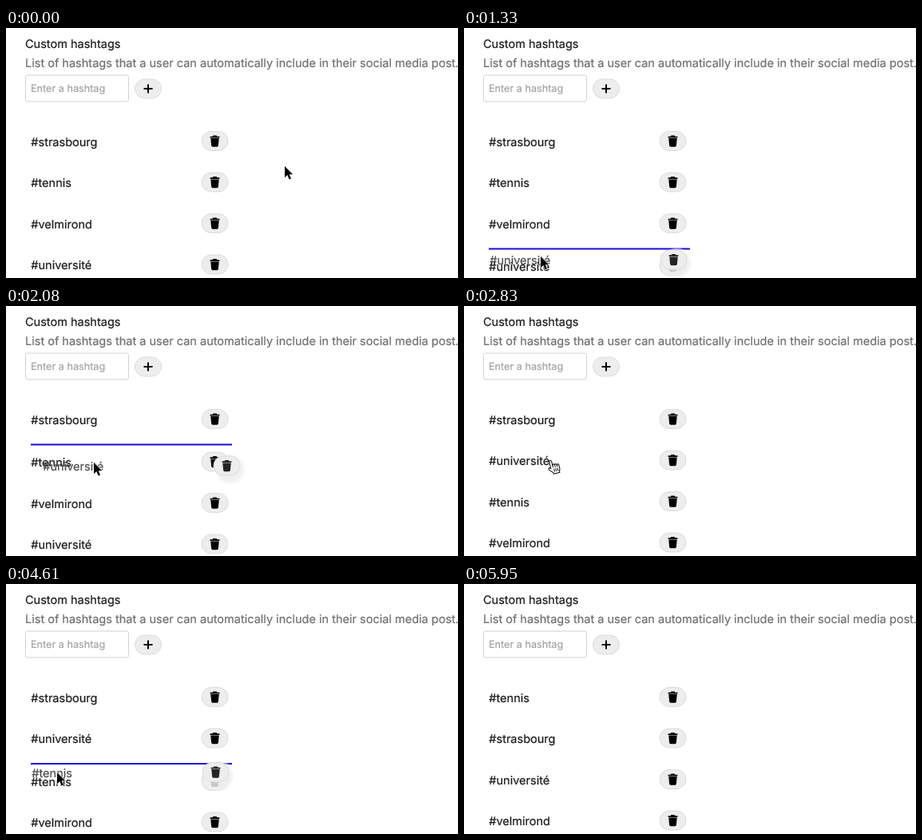
Recreate the animation shown at these times as an HTML page. Size 566 by 313 pixels, loop 6.7 s.

```html
<!DOCTYPE html>
<html lang="en">
<head>
<meta charset="utf-8">
<title>Custom hashtags</title>
<style>
  html, body { margin: 0; width: 100%; height: 100%; overflow: hidden; background: #fff; }
  svg { display: block; width: 566px; height: 313px; }
  text {
    font: 14.52px Inter, "Open Sans", sans-serif;
    fill: #1c1c1c; stroke: #1c1c1c; stroke-width: .22px;
    text-rendering: geometricPrecision;
  }
  .hint { fill: #707070; stroke: #707070; }
  .placeholder { font-size: 12.65px; fill: #a4a4a4; stroke: #a4a4a4; }
  .field { fill: #fff; stroke: #d2d2d2; }
  .pill { fill: #ededed; stroke: #dcdcdc; }
  #ghost text { opacity: .78; }
  #ghost .pill { fill: #f1f1f1; stroke: #e6e6e6; fill-opacity: .92; }
  #ghost .bin { opacity: .85; }
</style>
</head>
<body>
<svg viewBox="0 0 566 313">
  <defs>
    <radialGradient id="soft">
      <stop offset="0" stop-color="#e9e9e9"/>
      <stop offset=".8" stop-color="#efefef" stop-opacity=".8"/>
      <stop offset="1" stop-color="#f4f4f4" stop-opacity=".4"/>
    </radialGradient>
    <g id="button">
      <rect class="pill" x="-16.5" y="-12" width="33" height="24" rx="12"/>
    </g>
    <g id="trash">
      <use href="#button"/>
      <path class="bin" d="M-5.9-5.8H-3L-2-7H2L3-5.8H5.9V-4.1H-5.9ZM-5.2-3.5H5.2L4.4 5.6Q4.2 7.2 2.8 7.2H-2.8Q-4.2 7.2-4.4 5.6Z"/>
    </g>
  </defs>

  <text x="24" y="25">Custom hashtags</text>
  <text class="hint" x="24" y="49">List of hashtags that a user can automatically include in their social media post.</text>
  <rect class="field" x="24.5" y="59" width="129" height="33" rx="2.5"/>
  <text class="placeholder" x="31" y="80.2">Enter a hashtag</text>
  <use href="#button" x="178" y="76"/>
  <path d="M172.5 76H183.5M178 70.5V81.5" stroke="#000" stroke-width="2"/>

  <g id="list"></g>
  <rect id="marker" x="31" width="252" height="2" fill="#2008d8"/>
  <g id="ghost">
    <circle cx="265.5" cy="4" r="19" fill="url(#soft)"/>
  </g>

  <path id="arrow" d="M0 0V14.2L3.3 11.1 5.6 16.5 8 15.5 5.7 10.2H10.2Z"
        stroke="#fff" stroke-width="1.3" stroke-linejoin="round" paint-order="stroke"/>
  <g id="hand" fill="#fff" stroke="#000" stroke-linejoin="round" stroke-linecap="round">
    <g transform="translate(-1 -1.3) rotate(-15 2 9)">
      <path d="M-1.5 10V1.5a1.5 1.5 0 0 1 3 0V6.6a1.4 1.4 0 0 1 2.8.3a1.3 1.3 0 0 1 2.6.6a1.2 1.2 0 0 1 2.3.8V12q0 2-1.2 3.6V17.4H.2V16Q-2 13.5-4.4 10.6a1.4 1.4 0 0 1 2.3-1.5z"/>
      <path d="M1.5 6.6V9M4.3 7V9.2M6.9 7.6V9.6M2 11.6V14.6M4.2 11.6V14.6M6.4 11.6V14.6" fill="none" stroke-width=".9"/>
    </g>
  </g>
</svg>

<script>
const LOOP = 6700, TOP = 142, PITCH = 51.5;
const tags = { s: "#strasbourg", t: "#tennis", n: "#velmirond", u: "#université" };

// Row order from each time on
const orders = [[0, "stnu"], [2380, "sutn"], [5350, "tsun"]];

const drags = [
  { from: 1330, to: 2380, tag: "u", x: 95, y: 292 },
  { from: 4610, to: 5350, tag: "t", x: 63, y: 245 },
];

// Pointer steps: time, x, y, shape
const pointer = [
  [0, 349, 173, "arrow"], [290, 336, 188, "arrow"], [440, 252, 230, "hand"],
  [590, 153, 270, "hand"], [740, 111, 288, "hand"], [890, 100, 294, "hand"],
  [1030, 95, 292, "hand"],
  [1330, 96, 286, "arrow"], [1480, 99, 260, "arrow"], [1630, 103, 231, "arrow"],
  [1780, 106, 214, "arrow"], [1930, 109, 202, "arrow"], [2080, 110, 196, "arrow"],
  [2230, 111, 193, "arrow"],
  [2830, 111, 194, "hand"], [2980, 107, 204, "hand"], [3130, 97, 223, "hand"],
  [3280, 84, 242, "hand"], [3430, 73, 253, "hand"], [3580, 66, 252, "hand"],
  [3710, 63, 247, "hand"],
  [4610, 64, 236, "arrow"], [4760, 69, 205, "arrow"], [4910, 76, 165, "arrow"],
  [5060, 81, 131, "arrow"],
  [5650, 82, 133, "hand"], [5800, 87, 138, "hand"], [5950, 0, 0, ""],
];

const $ = id => document.getElementById(id);
const at = (steps, t) => steps.findLast(s => s[0] <= t);
const move = (el, x, y) => el.setAttribute("transform", `translate(${x} ${y})`);
const show = (el, on) => el.setAttribute("visibility", on ? "visible" : "hidden");
const rowY = i => TOP + i * PITCH;

function add(parent, name, attrs) {
  const el = document.createElementNS("http://www.w3.org/2000/svg", name);
  for (const key in attrs) el.setAttribute(key, attrs[key]);
  return parent.appendChild(el);
}

function addRow(parent, label) {
  const g = add(parent, "g", {});
  const text = add(g, "text", { x: 31.3, y: 5.6 });
  text.textContent = label;
  const button = g.appendChild($("trash").cloneNode(true));
  button.removeAttribute("id");
  move(button, 261.5, -.5);
  return g;
}

const rows = {};
for (const key in tags) rows[key] = addRow($("list"), tags[key]);
const ghost = $("ghost"), ghostText = addRow(ghost, "").firstChild;

function draw(t) {
  const order = at(orders, t)[1];
  const [, x, y, shape] = at(pointer, t);
  const drag = drags.find(d => t >= d.from && t < d.to);
  const over = drag ? Math.max(0, Math.min(3, Math.round((y - TOP) / PITCH))) : 4;

  [...order].forEach((key, i) => move(rows[key], 0, rowY(i) + (i >= over ? 2 : 0)));

  show($("marker"), drag);
  show(ghost, drag);
  if (drag) {
    $("marker").setAttribute("y", rowY(over) - 21);
    ghostText.textContent = tags[drag.tag];
    move(ghost, x - drag.x, rowY(order.indexOf(drag.tag)) + y - drag.y);
  }

  for (const id of ["arrow", "hand"]) {
    show($(id), id === shape);
    move($(id), x, y);
  }
}

const start = performance.now();
function tick() {
  draw((performance.now() - start) % LOOP);
  requestAnimationFrame(tick);
}
tick();
</script>
</body>
</html>
```
